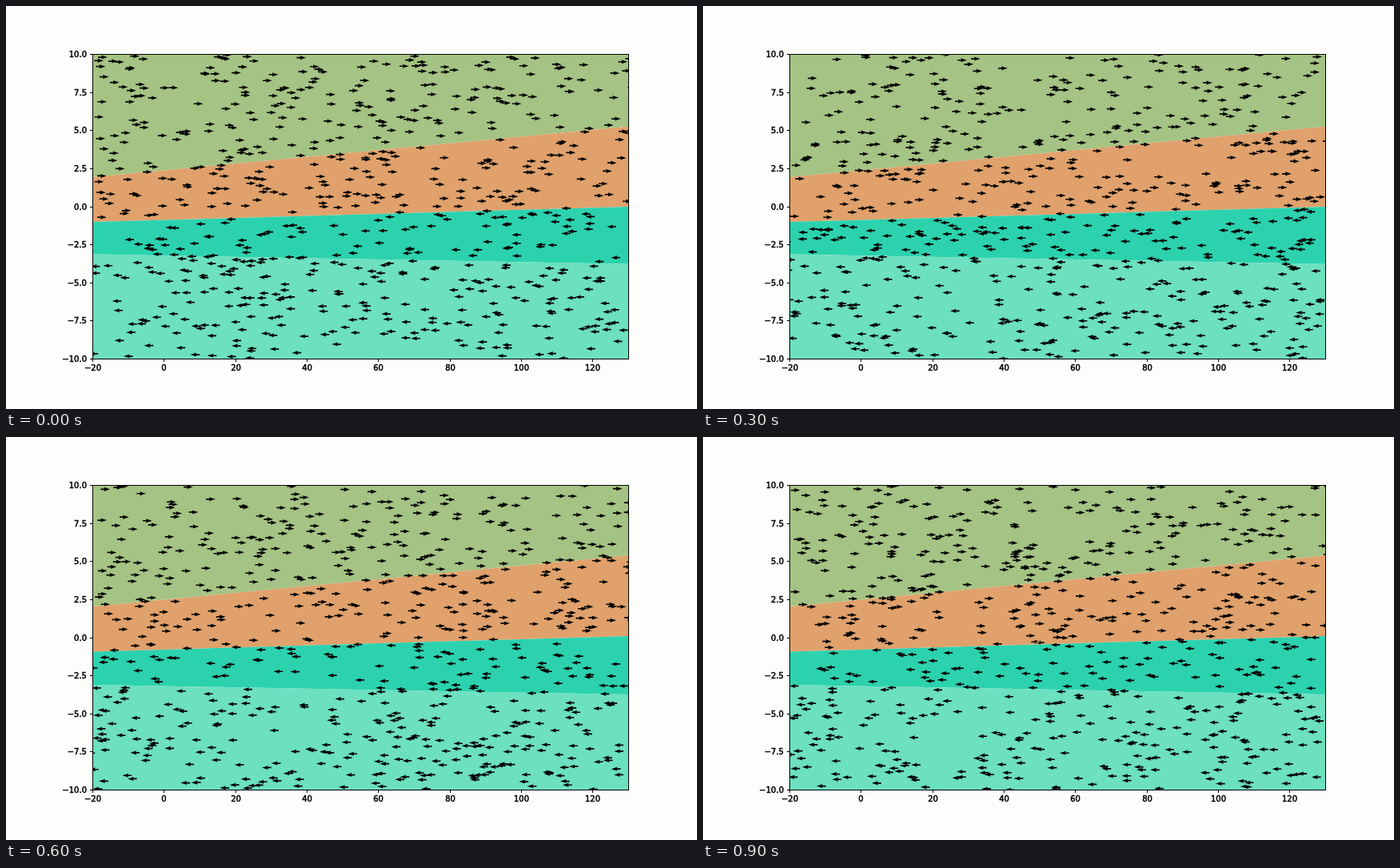
These frames come from a looping animation (864 px wide and 504 px high, 1000 ms). An HTML page:

```html
<!DOCTYPE html>
<html lang="en">
<head>
<meta charset="utf-8">
<title>Layered flow</title>
<style>
  html, body { margin: 0; width: 100%; height: 100%; overflow: hidden; background: #fdfdfc; }
  svg { display: block; width: 864px; height: 504px; }
  text { font: 10px "DejaVu Sans", sans-serif; stroke: #000; stroke-width: .5px; }
</style>
</head>
<body>
<svg id="stage" viewBox="0 0 864 504"></svg>
<script>
const NS = 'http://www.w3.org/2000/svg';
const stage = document.getElementById('stage');
const box = { x: 108.5, y: 60.5, width: 670, height: 381 };
const right = box.x + box.width, bottom = box.y + box.height;
const STEP = 100, STEPS = 10, COUNT = 680;
const colors = ['#a5c384', '#e0a16c', '#2cd2ae', '#6ce0bf'];

// The borders sink early in the loop, then rest
const sinkKeys = [2, 4, 7, 2, 1];
const sinkAt = step => sinkKeys[step] || 0;

function add(name, attrs, parent = stage) {
  const el = document.createElementNS(NS, name);
  for (const key in attrs) el.setAttribute(key, attrs[key]);
  return parent.appendChild(el);
}

function label(x, y, anchor, value) {
  add('text', { x, y, 'text-anchor': anchor }).textContent = value.replace('-', '\u2212');
}

// Small seeded generator
function random(seed) {
  return () => {
    seed = (seed + 0x6D2B79F5) | 0;
    let n = Math.imul(seed ^ (seed >>> 15), 1 | seed);
    n = (n + Math.imul(n ^ (n >>> 7), 61 | n)) ^ n;
    return ((n ^ (n >>> 14)) >>> 0) / 4294967296;
  };
}

// Left and right height of each layer border, from top to bottom
function bordersAt(step) {
  const s = sinkAt(step);
  return [
    [box.y, box.y],
    [212 + s, 148 + 1.3 * s],
    [268.5 + .8 * s, 249 + s],
    [310 + .3 * s, 322 + .35 * s],
    [bottom, bottom]
  ];
}

function layerPath([topL, topR], [lowL, lowR]) {
  return `M${box.x} ${topL}L${right} ${topR}V${lowR}L${box.x} ${lowL}z`;
}

// Arrow starting at x, pointing right (dir 1) or left (dir -1)
function arrow(x, y, dir) {
  const h = n => n * dir;
  return `M${x.toFixed(1)} ${(y - .85).toFixed(1)}h${h(4.7)}l${h(-.8)} -1.7l${h(7.8)} 2.55` +
    `l${h(-7.8)} 2.55l${h(.8)} -1.7h${h(-4.7)}z`;
}

// Fresh scatter for each step; the flow reverses just above the middle border
function arrowPath(step, [midL, midR]) {
  const next = random(71 + step * 997);
  return Array.from({ length: COUNT }, () => {
    const u = next();
    const y = box.y + next() * box.height;
    const turn = midL + u * (midR - midL) - 3;
    return arrow(box.x + u * box.width, y, y < turn ? 1 : -1);
  }).join('');
}

add('rect', box, add('clipPath', { id: 'plot' }));
const layers = colors.map(fill => add('path', { fill }));
const arrows = add('path', { 'clip-path': 'url(#plot)' });

for (let v = -20; v <= 120; v += 20) {
  const x = Math.floor(box.x + (v + 20) / 150 * box.width) + .5;
  add('path', { d: `M${x} ${bottom}v3.5`, stroke: '#000' });
  label(x, 456, 'middle', String(v));
}
for (let v = -10; v <= 10; v += 2.5) {
  const y = Math.floor(bottom - (v + 10) / 20 * box.height) + .5;
  add('path', { d: `M${box.x} ${y}h-3.5`, stroke: '#000' });
  label(101, y + 3.6, 'end', v.toFixed(1));
}
add('rect', { ...box, fill: 'none', stroke: '#000' });

let shown = -1;
function draw(time) {
  const step = Math.floor(time / STEP) % STEPS;
  if (step === shown) return;
  shown = step;
  const borders = bordersAt(step);
  layers.forEach((el, i) => el.setAttribute('d', layerPath(borders[i], borders[i + 1])));
  arrows.setAttribute('d', arrowPath(step, borders[2]));
}

function tick() {
  draw(performance.now());
  requestAnimationFrame(tick);
}
tick();
</script>
</body>
</html>
```
